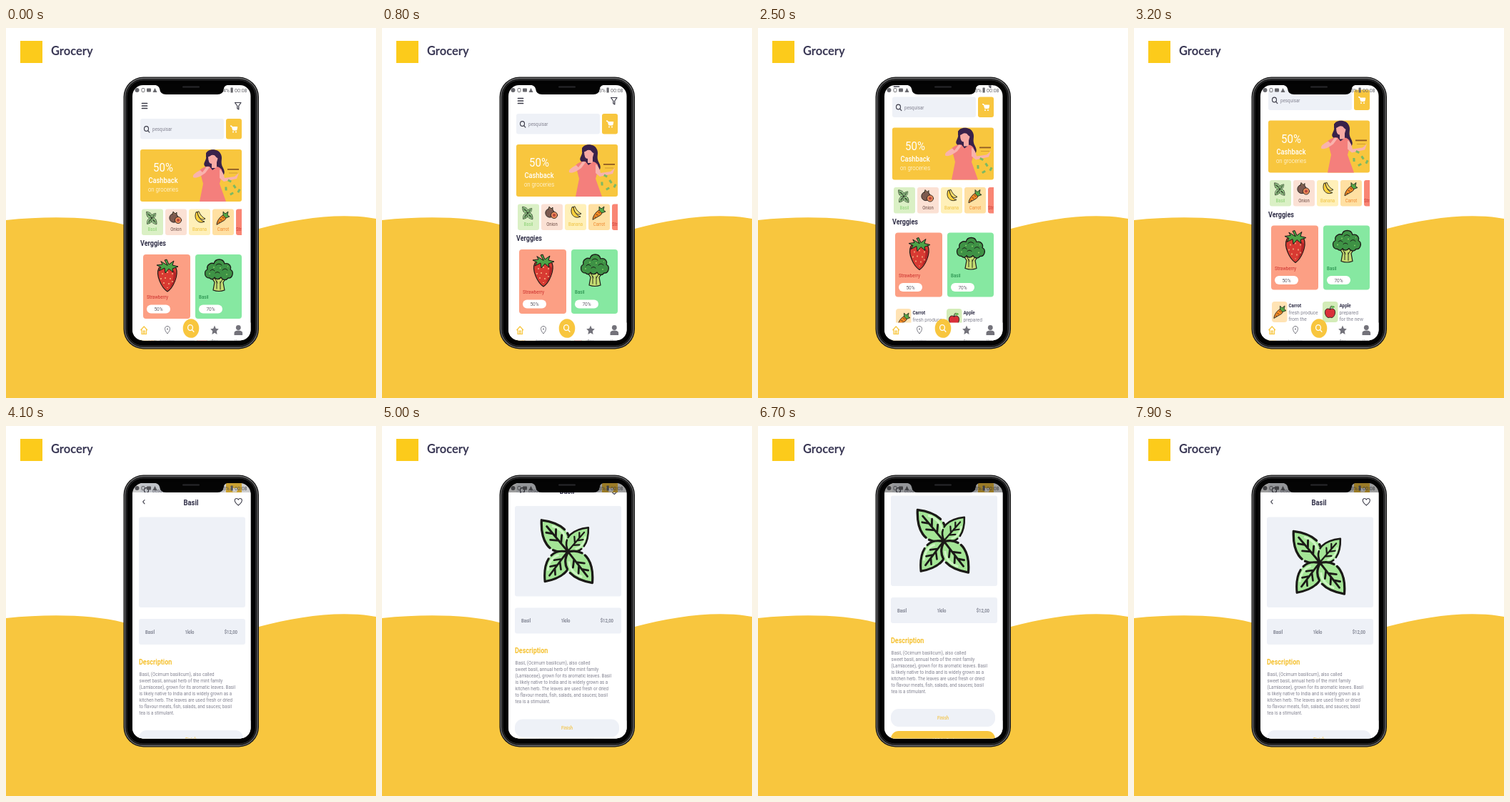
Write an HTML page that moves like this. It is 518 px wide and 518 px high and loops after 8 s.

```html
<!DOCTYPE html>
<html lang="en">
<head>
<meta charset="utf-8">
<title>Grocery</title>
<style>
html, body { margin: 0; width: 100%; height: 100%; overflow: hidden; background: #fff }
svg { display: block; width: 100vw; height: 100vh }
text { font-family: Roboto, "Open Sans", sans-serif }
.line { fill: none; stroke: #3b3b48; stroke-linecap: round; stroke-linejoin: round }
.ink { stroke: #1b1a17; stroke-linecap: round; stroke-linejoin: round }
</style>
</head>
<body>
<svg id="stage" viewBox="0 0 518 518"></svg>
<script>
const YELLOW = '#f8c63e', PALE = '#eef1f7', DARK = '#33324a', GREY = '#858593';

const box = (x, y, w, h, fill, r = 3, more = '') =>
  `<rect x="${x}" y="${y}" width="${w}" height="${h}" rx="${r}" fill="${fill}" ${more}/>`;
const path = (d, fill = 'none', more = '') => `<path d="${d}" fill="${fill}" ${more}/>`;
const dot = (x, y, r, fill, more = '') => `<circle cx="${x}" cy="${y}" r="${r}" fill="${fill}" ${more}/>`;
// The app screen is taller than its layout, so all of its text shares one aspect.
const text = (s, x, y, size, fill, weight = 400, anchor = 'start') =>
  `<text transform="translate(${x} ${y}) scale(1 1.14)" font-size="${size}" fill="${fill}" font-weight="${weight}" text-anchor="${anchor}">${s}</text>`;
const place = (art, x, y, s = 1) => `<g transform="translate(${x} ${y}) scale(${s})">${art}</g>`;
const ink = w => `class="ink" stroke-width="${w}"`;
const line = (d, w = 1.1) => `<path class="line" d="${d}" stroke-width="${w}"/>`;

// Produce, each centred on 0,0
const leaf = (angle, length) => `<g transform="rotate(${angle}) scale(${length / 55})">` +
  path('M1 0C9 19 30 23 55 0C30 -23 9 -19 1 0Z', '#a4e596', ink(3.2) + ' pathLength="100" stroke-dasharray="19 5 52 0 5 4 15 0"') +
  path('M12 7Q24 16 40 6', 'none', 'stroke="#cff5c4" stroke-width="3"') +
  path('M0 0H44M14 0L22 8M25 0L33 7M19 0L27 -8M31 0L38 -6', 'none', ink(2.8)) + '</g>';
const basil = leaf(-130, 57) + leaf(-49, 44) + leaf(127, 53) + leaf(52, 56);

const strawberry =
  path('M-12 -10C-17 0 -8 18 0 23C8 18 16 0 12 -10C8 -16 -8 -16 -12 -10Z', '#d83a32', ink(1.2)) +
  path('M5 -10Q13 -2 3 18Q12 11 12 -3Z', '#b32527') +
  path('M-7 -3v2M0 -5v2M7 -3v2M-9 4v2M-3 3v2M4 4v2M-5 10v2M2 11v2M7 8v2M0 17v1', 'none', 'stroke="#ffd59a" stroke-width="1.2"') +
  path('M0 -14L-4 -21L-1 -22L2 -15L9 -20L7 -14L15 -12L7 -9L8 -4L2 -9L-3 -3L-4 -10L-12 -6L-9 -11L-15 -14L-7 -15L-9 -19Z', '#4da347', ink(1));

const broccoli =
  path('M-11 2L-6 10L-8 21Q0 24 8 21L6 10L12 2Z', '#c5dd72', ink(1.2)) +
  path('M-3 8V19M2 9V20M-7 3L-2 11M7 3L2 11', 'none', ink(.9)) +
  path('M-13 4C-21 4 -21 -6 -16 -8C-18 -15 -10 -18 -7 -16C-5 -24 6 -24 8 -16C14 -18 18 -12 16 -8C22 -5 19 5 13 4C10 8 5 7 3 3C0 7 -5 6 -6 3C-8 7 -11 6 -13 4Z', '#3e9245', ink(1.3)) +
  path('M-12 -6q3 -4 6 0M-4 -14q4 -4 8 0M5 -7q4 -4 7 0M-5 -3q3 -3 6 0', 'none', ink(1)) +
  path('M-14 -2h2M-8 -11h2M1 -10h2M10 -1h2M12 -12h1', 'none', 'stroke="#82c964" stroke-width="1.5"');

const onion =
  dot(-2, 0, 6.2, '#7c5a50', ink(.8)) + path('M-4 -5L-3 -9L0 -6L2 -8L2 -5', '#8c6a52', ink(.8)) +
  dot(4, 3, 4.6, '#e98b5b', ink(.8)) + dot(4, 3, 2, '#b5443d');
const banana =
  path('M-4 -8C-8 2 0 9 8 5C2 4 -1 -2 -2 -8Z', '#ffd23d', ink(.9)) +
  path('M-2 -8C-1 0 4 4 9 1C5 -1 2 -4 0 -9Z', '#ffe06a', ink(.9));
const carrot =
  path('M-8 9C-8 4 -2 -4 2 -4C6 -3 5 2 3 3Z', '#f58a24', ink(.9)) +
  path('M1 -4L1 -9L4 -6L8 -9L7 -4L10 -2L5 0Z', '#55a847', ink(.8)) +
  path('M-3 2l2 1M0 -1l2 1M-5 6l1 0', 'none', ink(.7));
const apple =
  path('M0 -4C-8 -8 -10 3 -4 8Q-2 9 0 8Q2 9 4 8C10 3 8 -8 0 -4Z', '#d9303a', ink(.9)) +
  path('M0 -4Q0 -8 2 -9', 'none', ink(1)) + path('M1 -7Q5 -11 7 -7Q4 -5 1 -7Z', '#5aae48');

const search = (x, y, s, color, w) => `<g fill="none" stroke="${color}" stroke-width="${w}" stroke-linecap="round">` +
  `<ellipse cx="${x}" cy="${y}" rx="${s}" ry="${s * 1.12}"/><path d="M${x + s * .7} ${y + s * .85}l${s * .75} ${s * .85}"/></g>`;

const woman =
  path('M280 177C280 169 297 167 301 177C304 184 299 187 304 196C308 203 305 209 297 208L279 194C274 189 282 186 280 177Z', '#39224a') +
  path('M283 180Q283 190 288 190V196H295V188L297 181Q290 175 283 180Z', '#f7aaa4') +
  path('M271 199Q278 193 285 194L289 199L296 194Q303 196 303 204L299 218L308 243H271L276 218Z', '#f47f7c') +
  path('M272 199Q260 205 262 209Q267 212 279 203L285 195L281 194L275 202Z', '#f9b3ad') +
  path('M299 198Q304 200 306 210L320 208L326 203L323 211L305 215L299 210Z', '#f9b3ad') +
  path('M280 181Q288 180 290 174Q293 182 300 184L299 174Q290 167 280 175Z', '#39224a') +
  box(310, 197, 16, 1.8, '#8e5b25', 0) + path('M312 203h12', 'none', 'stroke="#d29c34"') +
  [[313, 214], [320, 222], [308, 225], [326, 228], [316, 232]].map(([x, y], i) =>
    box(x - 2.5, y - 1.5, 5, 3, '#7cb963', 0, `transform="rotate(${25 + i * 31} ${x} ${y})"`)).join('');

const tiles = [
  ['Basil', '#daf0c5', '#8bd174', place(basil, 204, 266, .2)],
  ['Onion', '#fbe1d4', '#6c4a43', place(onion, 237, 266)],
  ['Banana', '#fff0b9', '#efc340', place(banana, 270, 266)],
  ['Carrot', '#ffe0a2', '#ee8930', place(carrot, 303, 266)],
  ['Strawberry', '#f98574', '#c93a36', '']
].map(([name, fill, color, art], i) => box(190 + 33 * i, 253.5, 30, 36.5, fill) + art +
  (i < 4 ? text(name, 205 + 33 * i, 284, 6, color, 400, 'middle') : text(name, 322, 284, 6, color))).join('');

const card = (x, w, fill, name, color, percent, art) => box(x, 317, w, 90, fill, 4) + art +
  text(name, x + 5, 379, 6.2, color, 500) + box(x + 5, 387.5, 33, 12, '#fff', 6) +
  text(percent, x + 21.5, 396.2, 6.6, '#64606b', 400, 'middle');
const item = (x, fill, art, name, a, b) => box(x, 423.5, 21.5, 29, fill, 4) + place(art, x + 10.5, 438, .95) +
  text(name, x + 23.5, 431.5, 6.3, DARK, 700) + text(a, x + 23.5, 441.5, 6.7, GREY) + text(b, x + 23.5, 450.7, 6.7, GREY);

const home =
  line('M190.5 105.5h7M190.5 109h7M190.5 112.5h7', 1.7) +
  line('M320.5 104.5h8.5l-3.2 4.5v5l-2 -1.2v-3.8z', 1.2) +
  box(188, 127, 117, 28.5, PALE) + search(196.5, 141, 3, '#3b3b48', 1.1) + text('pesquisar', 205, 144, 6.3, GREY) +
  box(308, 127, 22, 28.5, YELLOW) +
  path('M314 137h2l1.6 6h5.2l1 -4.5h-7.5z', '#fff', 'stroke="#fff"') + dot(318, 145.5, 1, '#fff') + dot(322, 145.5, 1, '#fff') +
  box(188, 170, 142, 73, YELLOW) + woman +
  text('50%', 220, 201, 15, '#fff', 400, 'middle') + text('Cashback', 220, 217, 9.3, '#fff', 500, 'middle') +
  text('on groceries', 220, 229, 7.8, '#fff', 300, 'middle') +
  `<g clip-path="url(#row)">${tiles}</g>` +
  text('Verggies', 188, 305, 9, DARK, 700) +
  card(192, 66, '#fc9f84', 'Strawberry', '#d4433c', '50%', place(strawberry, 226, 346)) +
  card(265, 65, '#86e8a1', 'Basil', '#2c9451', '70%', place(broccoli, 298, 346)) +
  item(193, '#ffe3b4', carrot, 'Carrot', 'fresh produce', 'from the') +
  item(264, '#d3ecb8', apple, 'Apple', 'prepared', 'for the new');

const status = dot(183.5, 87, 3, '#68686d') + box(190, 84.5, 4, 5, 'none', 1, 'stroke="#77777b"') +
  box(197, 84.5, 6, 5, '#68686d', 1) + path('M205.5 90l3 -6l3 6z', '#68686d') +
  `<g id="battery">${text('84%', 313, 90, 7, '#66666b', 400, 'end')}</g>` +
  box(314.5, 83.5, 3.2, 7, '#66666b', .5) + text('00:08', 337.5, 90, 7, '#66666b', 400, 'end');

const nav = box(177, 412.5, 166, 26, '#fff', 0) +
  `<g fill="none" stroke="${YELLOW}" stroke-width="1.2"><path d="M188.5 423l4.7 -5l4.7 5M190 422v6.500h6.500v-6.500M192.200 428v-4h2v4"/></g>` +
  path('M226 428C220 421 223 417.500 226 417.500S232 421 226 428Z', 'none', 'stroke="#777780"') + dot(226, 421.5, 1, '#777780') +
  `<ellipse cx="259" cy="420.500" rx="11.300" ry="13.300" fill="${YELLOW}"/>` + search(258, 419.5, 3.4, '#fff', 1.3) +
  path('M292 416.500l1.800 4.300l4 .5l-3 3l.8 4.700l-3.600 -2.300l-3.600 2.300l.8 -4.700l-3 -3l4 -.5z', '#73727a') +
  dot(325.3, 419.5, 3.4, '#73727a') + path('M319.500 430v-3q0 -3.500 5.800 -3.500t5.800 3.500v3z', '#73727a') +
  ['Home', 'Location', '', 'Star', 'User'].map((s, i) =>
    text(s, 193 + 33 * i, 439.5, 5, i ? '#77777f' : YELLOW, 400, 'middle')).join('');

const description = ['Basil, (Ocimum basilicum), also called', 'sweet basil, annual herb of the mint family',
  '(Lamiaceae), grown for its aromatic leaves. Basil', 'is likely native to India and is widely grown as a',
  'kitchen herb. The leaves are used fresh or dried', 'to flavour meats, fish, salads, and sauces; basil', 'tea is a stimulant.'];

const detail =
  line('M194 103.500l-2.300 2.700l2.300 2.700') + text('Basil', 259, 110.5, 9.5, DARK, 700, 'middle') +
  line('M325.300 111C318 105.500 320 101.500 322.800 101.500Q324.700 101.500 325.300 103.300Q326 101.500 327.800 101.500C330.600 101.500 332.500 105.500 325.300 111Z') +
  box(186, 127.5, 149, 126.5, PALE) + `<g id="picture">${place(basil, 260, 191)}</g>` +
  box(186, 270, 149, 36, PALE) + text('Basil', 195, 291, 6, '#737786', 500) +
  text('1kilo', 257, 291, 6, '#737786', 500, 'middle') + text('$12,00', 324, 291, 6, '#737786', 500, 'end') +
  text('Description', 186, 334, 9, '#f5c130', 700) +
  description.map((s, i) => text(s, 186.5, 350 + 9 * i, 6.25, '#858593')).join('') +
  box(186, 426, 146, 25, PALE, 11) + text('Finish', 259, 440.5, 6, '#f3c44b', 500, 'middle') +
  box(186, 457, 146, 24, YELLOW, 11) + text('ADD to Cart', 259, 471.5, 6, '#fff', 700, 'middle');

const stage = document.getElementById('stage');
stage.innerHTML = `
<defs>
  <clipPath id="screen"><rect x="177" y="80" width="165.500" height="357.500" rx="15"/></clipPath>
  <clipPath id="row"><rect x="188" y="250" width="142" height="44"/></clipPath>
  <clipPath id="page"><rect x="177" y="93" width="166" height="345"/></clipPath>
</defs>
${path('M0 269C60 263 120 264 164 275C230 292 300 297 354 281C410 266 470 258 518 267V518H0Z', YELLOW)}
${box(20, 18, 31, 31, '#fccb1b', 0)}
<text x="63" y="38" font-size="16.500" font-weight="700" fill="#3a3855" style="font-family:Lato,'Open Sans',sans-serif">Grocery</text>
${box(164.5, 68.5, 189.5, 381, '#161616', 28)}
${box(166.5, 70.5, 185.5, 377, 'none', 26, 'stroke="#6e6e70" stroke-width="1.300"')}
${box(169, 73, 180.5, 372, '#030303', 23, 'stroke="#2c2c2e"')}
<g clip-path="url(#screen)">
  ${box(177, 80, 166, 358, '#fff', 0)}
  <g id="home">${home}</g>
  ${nav}${status}
  <rect id="dim" x="177" y="80" width="166" height="358"/>
  <g id="sheet"><g clip-path="url(#page)">${box(177, 93, 166, 345, '#fff', 0)}<g id="detail">${detail}</g></g></g>
</g>
${path('M205 79H314Q305 80 305 85Q304 93 296 93H224Q216 93 215 85Q214 80 205 79Z', '#040404')}
${box(247, 81.5, 24, 2, '#29292c', 1)}`;

const get = id => document.getElementById(id);
const [homeEl, sheetEl, detailEl, dimEl, pictureEl] = ['home', 'sheet', 'detail', 'dim', 'picture'].map(get);
const batteryEl = get('battery').firstElementChild;

const clamp = v => Math.max(0, Math.min(1, v));
const span = (t, a, b) => clamp((t - a) / (b - a));
const smooth = p => p * p * (3 - 2 * p);
const along = (t, keys) => keys.slice(1).reduce((v, [time, value], i) =>
  v + (value - keys[i][1]) * span(t, keys[i][0], time), keys[0][1]);
const shift = (el, y) => el.setAttribute('transform', `translate(0 ${y.toFixed(2)})`);

function draw(now) {
  const t = Math.floor(now % 8000 / 100) * 100;
  shift(homeEl, -along(t, [[0, 0], [800, 7], [1800, 20.5], [3200, 40.5], [3700, 51]]));
  shift(sheetEl, 345 * (1 - span(t, 3700, 4100)) ** 3);
  shift(detailEl, -60 * (smooth(span(t, 4700, 5600)) - smooth(span(t, 6200, 7200))));
  dimEl.setAttribute('opacity', .38 * span(t, 3700, 4500));
  pictureEl.setAttribute('opacity', t < 4300 ? 0 : 1);
  batteryEl.textContent = t < 400 ? '84%' : '83%';
  requestAnimationFrame(loop);
}
const start = performance.now();
function loop() { draw(performance.now() - start); }
loop();
</script>
</body>
</html>
```
